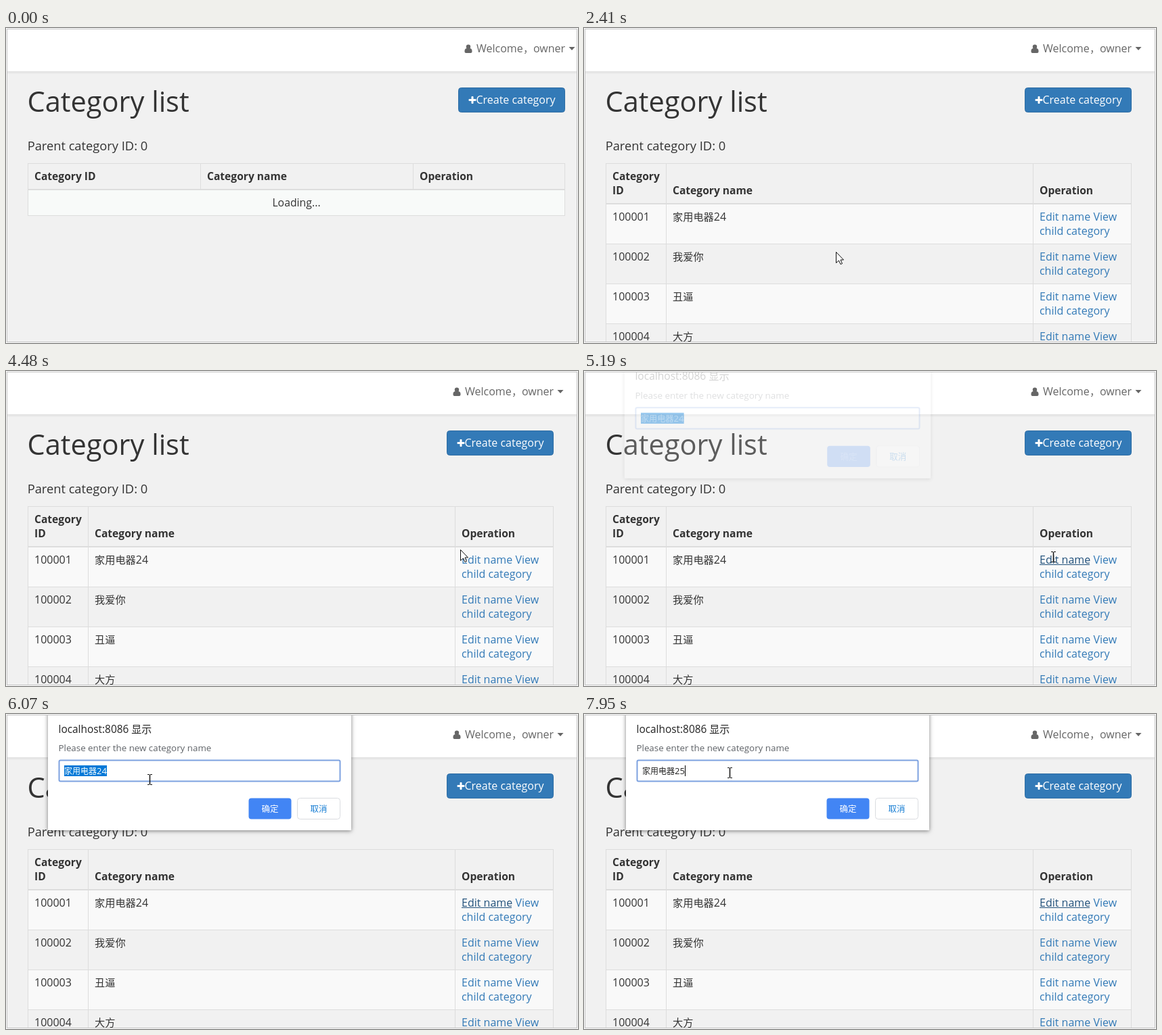
An HTML page with a canvas for the animation above (8 s loop, 845x466 px).

```html
<!DOCTYPE html>
<html lang="en">
<head>
<meta charset="utf-8">
<title>Category list</title>
<style>
html, body { margin: 0; width: 100%; height: 100%; overflow: hidden; background: #fff; }
canvas { display: block; }
</style>
</head>
<body>
<canvas id="stage" width="845" height="466"></canvas>
<script>
const ctx = document.getElementById('stage').getContext('2d');
const LOOP = 8000, STEP = 80;
const LOADED = 2410, HOVER = 4560, DIALOG = 5190, CLICK = 6310;
const LATIN = '"Open Sans", "Noto Sans CJK SC", "Noto Sans CJK", sans-serif';
const CJK = '"Noto Sans CJK SC", "Noto Sans CJK", sans-serif';
const INK = '#333', LINE = '#ddd', LINK = '#337ab7';

const ROWS = ['家用电器|24', '我爱你|', '丑逼|', '大方|'];

// start time, number of steps, end x, end y, optional curve control point
const MOVES = [
  [370, 3, 38, 393],
  [770, 6, 372, 331],
  [2960, 6, 189, 270],
  [3600, 11, 658, 259, 420, 321],
  [4480, 1, 671, 264],
  [4560, 2, 693, 270],
  [4880, 1, 693, 274],
  [5030, 1, 693, 275],
  [5270, 10, 210, 102],
  [6070, 1, 212, 97],
  [6150, 2, 212, 84],
  [7950, 1, 215, 87]
];

function rect(x, y, w, h, color) {
  ctx.fillStyle = color;
  ctx.fillRect(x, y, w, h);
}

function box(x, y, w, h, r, fill, stroke, weight = 1) {
  ctx.beginPath();
  ctx.roundRect(x + weight / 2, y + weight / 2, w - weight, h - weight, r);
  ctx.fillStyle = fill;
  ctx.fill();
  if (!stroke) return;
  ctx.strokeStyle = stroke;
  ctx.lineWidth = weight;
  ctx.stroke();
}

function text(str, x, y, size, color = INK, { weight = 400, family = LATIN, align = 'left' } = {}) {
  ctx.font = `${weight} ${size}px ${family}`;
  ctx.textAlign = align;
  ctx.fillStyle = color;
  ctx.fillText(str, x, y);
  return ctx.measureText(str).width;
}

const bold = (str, x, y) => text(str, x, y, 15.6, INK, { weight: 700 });

// Chinese text followed by digits; returns the right end
function mixed(cjk, digits, x, y, cjkSize, digitSize, color) {
  x += text(cjk, x, y, cjkSize, color, { family: CJK });
  return x + text(digits, x, y, digitSize, color);
}

function userIcon(x, y) {
  ctx.fillStyle = '#666';
  ctx.beginPath();
  ctx.arc(x + 5.5, y + 3.2, 3.2, 0, 7);
  ctx.fill();
  ctx.beginPath();
  ctx.roundRect(x, y + 5.5, 11, 7, [4, 4, 2, 2]);
  ctx.fill();
}

function header(dx) {
  rect(0, 0, 845, 64, '#fff');
  rect(0, 64, 845, 2, '#e3e3e3');
  rect(0, 66, 845, 2, '#ebebeb');
  const gray = '#666';
  userIcon(677.5 + dx, 24.5);
  text('Welcome', 695 + dx, 36, 16, gray);
  text('，', 764 + dx, 36, 15, gray, { family: CJK });
  text('owner', 779 + dx, 36, 16, gray);
  ctx.beginPath();
  ctx.moveTo(831.5 + dx, 28);
  ctx.lineTo(840.5 + dx, 28);
  ctx.lineTo(836 + dx, 33);
  ctx.fill();

  text('Category list', 31.5, 124, 41.5);
  box(668 + dx, 88, 158, 37, 4, LINK, '#2e6da4');
  box(683 + dx, 104.5, 12, 4, 1, '#fff');
  box(687 + dx, 100.5, 4, 12, 1, '#fff');
  text('Create category', 694.5 + dx, 112, 16, '#fff');
  text('Parent category ID: 0', 31.7, 181, 18.3);
}

function grid(right, columns, headEnd, lines, bottom) {
  for (const x of [32, ...columns, right]) {
    const end = columns.includes(x) && lines.length === 1 ? headEnd : bottom;
    rect(x, 200, 1, end - 200, LINE);
  }
  rect(32, 200, right - 31, 1, LINE);
  rect(32, headEnd - 2, right - 31, 2, LINE);
  for (const y of lines) rect(32, y, right - 31, 1, LINE);
}

function loadingTable() {
  rect(32, 240, 794, 38, '#f8faf9');
  grid(825, [287, 601], 240, [277], 278);
  bold('Category ID', 42, 225);
  bold('Category name', 297, 225);
  bold('Operation', 611, 225);
  text('Loading...', 429, 264, 15.8, INK, { align: 'center' });
}

function dataTable(hover) {
  for (const y of [261, 379]) rect(32, y, 776, 58, '#f9f9f9');
  grid(808, [121, 663], 261, [319, 378, 437], 465);
  bold('Category', 42, 225);
  bold('ID', 42, 246);
  bold('Category name', 131, 246);
  bold('Operation', 673, 246);
  ROWS.forEach((row, i) => {
    const y = 285 + 59 * i, [cjk, digits] = row.split('|');
    const hot = hover && i === 0;
    text(String(100001 + i), 42, y, 16);
    mixed(cjk, digits, 131, y, 15.2, 16, INK);
    const w = text('Edit name', 673, y, 16, hot ? '#23527c' : LINK);
    if (hot) rect(673, y + 1, Math.round(w) - 1, 1, '#23527c');
    text('View', 752.5, y, 16, LINK);
    text('child category', 673, y + 21, 16, LINK);
  });
}

function fieldText(t) {
  const selected = t < CLICK;
  const digits = t < 7100 ? '24' : t < 7560 ? '2' : '25';
  if (selected) {
    ctx.globalAlpha = Math.max(ctx.globalAlpha, 0.4);
    rect(86, 76, 63, 16, '#0078d7');
  }
  const end = mixed('家用电器', digits, 86, 89, 12, 13, selected ? '#fff' : '#222');
  const caretOn = !selected && (t < 6860 || t >= 7100);
  if (caretOn) rect(Math.round(end), 76, 1, 16, '#000');
}

// The shadow is kept outside the panel so it cannot show through while fading
function panel(x, y, w, h) {
  ctx.save();
  ctx.beginPath();
  ctx.rect(-50, -50, 950, 570);
  ctx.rect(x, y, w, h);
  ctx.clip('evenodd');
  ctx.shadowColor = 'rgba(0,0,0,0.5)';
  ctx.shadowBlur = 6;
  ctx.shadowOffsetY = 1;
  rect(x, y, w, h, '#fff');
  ctx.restore();
  rect(x, y, w, h, '#fff');
}

function dialog(t) {
  const shown = Math.min(1, 0.2 + 0.5 * Math.floor((t - DIALOG) / STEP));
  const away = (1 - shown) / 0.8, scale = 1 + 0.01 * away;
  ctx.save();
  ctx.globalAlpha = shown;
  ctx.translate(286 * (1 - scale), -15 * away);
  ctx.scale(scale, scale);
  panel(62, -20, 448, 192);
  const w = text('localhost:8086', 77.5, 28, 15.4, '#222');
  text('显示', 77.5 + w + 4, 28, 15, '#222', { family: CJK });
  text('Please enter the new category name', 77.5, 55, 13.33, '#5f6368');
  box(77.5, 67.5, 417, 33, 2, '#fff', '#7da2e0', 2);
  box(358, 124, 64, 32, 4, '#4285f4');
  text('确定', 390, 145, 12.5, '#fff', { family: CJK, weight: 500, align: 'center' });
  box(430, 124, 64, 32, 4, '#fff', '#dadce0');
  text('取消', 462, 145, 12.5, '#1a7fd4', { family: CJK, align: 'center' });
  fieldText(t);
  ctx.restore();
}

function pointer(t) {
  let x = 73, y = 470;
  for (const [start, n, ex, ey, cx = (x + ex) / 2, cy = (y + ey) / 2] of MOVES) {
    if (t < start) break;
    const u = Math.min(n, Math.floor((t - start) / STEP) + 1) / n;
    const s = u * u * (3 - 2 * u), r = 1 - s;
    x = r * r * x + 2 * r * s * cx + s * s * ex;
    y = r * r * y + 2 * r * s * cy + s * s * ey;
  }
  return [Math.round(x), Math.round(y)];
}

function overText(t, x, y) {
  if (t >= 5270) return x > 78 && x < 494 && y > 68 && y < 100;
  if (t < LOADED || y < 266 || y > 290) return false;
  return (x > 131 && x < 211) || x >= 673;
}

function arrow(x, y) {
  const points = [[0, 0], [0, 16], [4, 12.5], [6.5, 18], [9, 17], [6.5, 11.5], [11, 11.5]];
  ctx.beginPath();
  for (const [px, py] of points) ctx.lineTo(x + px + 0.5, y + py + 0.5);
  ctx.closePath();
  ctx.fillStyle = '#fff';
  ctx.fill();
  ctx.strokeStyle = '#111';
  ctx.lineWidth = 1;
  ctx.stroke();
}

function beam(x, y) {
  rect(x - 0.25, y - 7, 1.5, 14, '#111');
  for (const dy of [-8, 7]) {
    rect(x - 3, y + dy, 3, 1, '#111');
    rect(x + 1, y + dy, 3, 1, '#111');
  }
}

function draw(t) {
  const loaded = t >= LOADED;
  rect(0, 0, 845, 466, '#f1f1f1');
  header(loaded ? -17 : 0);
  if (loaded) dataTable(t >= HOVER);
  else loadingTable();
  if (t >= DIALOG) dialog(t);
  if (t >= MOVES[0][0]) {
    const [x, y] = pointer(t);
    (overText(t, x, y) ? beam : arrow)(x, y);
  }
  ctx.lineWidth = 1;
  ctx.strokeStyle = '#fff';
  ctx.strokeRect(0.5, 0.5, 844, 465);
  ctx.strokeStyle = '#c3c3c3';
  ctx.strokeRect(1.5, 1.5, 842, 463);
}

const origin = performance.now();
function tick() {
  draw((performance.now() - origin) % LOOP);
  requestAnimationFrame(tick);
}
tick();
</script>
</body>
</html>
```
